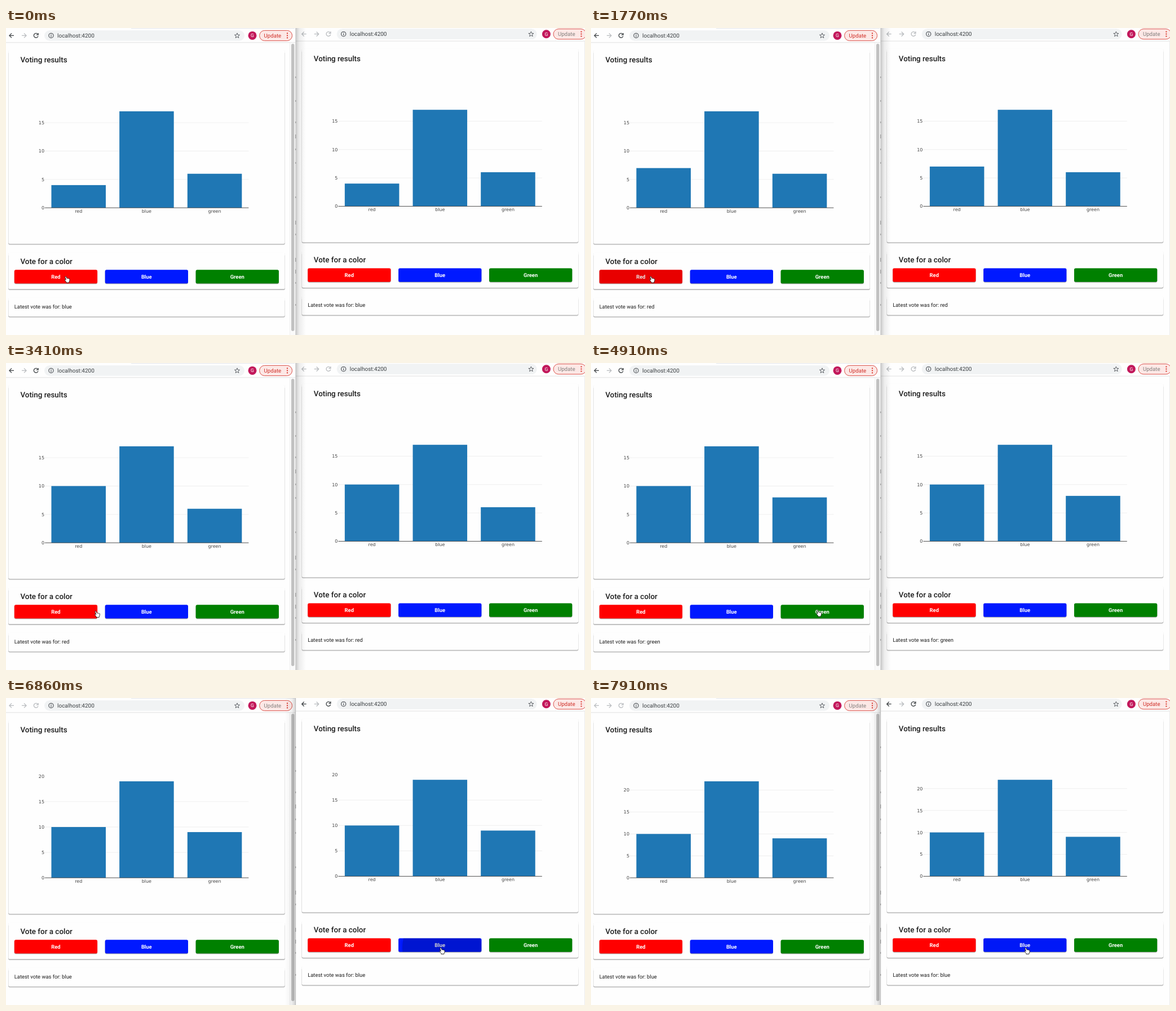
Recreate the animation shown at these times as an HTML page. Size 1027 by 545 pixels, loop 8000 ms.

```html
<!DOCTYPE html>
<html lang="en">
<head>
<meta charset="utf-8">
<title>Voting results</title>
<style>
html, body { margin: 0; width: 100%; height: 100%; overflow: hidden; background: #fefefe; }
svg { display: block; width: 1027px; height: 545px; }
text { font-family: Roboto, sans-serif; fill: #1c1c1c; white-space: pre; text-rendering: geometricPrecision; }
.title { font-size: 13.4px; font-weight: 500; }
.body { font-size: 9.4px; }
.label { font-size: 9.4px; font-weight: 700; fill: #fff; text-anchor: middle; }
.tick { font: 8px "DejaVu Sans", sans-serif; fill: #444; }
.btn { filter: drop-shadow(0 1px .6px rgba(0,0,0,.36)); }
.icon { fill: none; stroke-width: 1.3; }
</style>
</head>
<body>
<svg id="stage" viewBox="0 0 1027 545" xmlns="http://www.w3.org/2000/svg">
  <defs>
    <linearGradient id="fall"><stop offset="0" stop-opacity=".2"/><stop offset=".35" stop-opacity=".07"/><stop offset="1" stop-opacity="0"/></linearGradient>
    <linearGradient id="rise"><stop offset="0" stop-opacity="0"/><stop offset=".65" stop-opacity=".05"/><stop offset="1" stop-opacity=".17"/></linearGradient>
  </defs>
</svg>
<script>
const LOOP = 8000, CLICK = 90, ENTER = 225, EXIT = 150, FOCUS_AT = 6260;
const stage = document.getElementById('stage');

function add(parent, tag, attrs, text) {
  const node = document.createElementNS('http://www.w3.org/2000/svg', tag);
  set(node, attrs);
  if (text !== undefined) node.textContent = text;
  parent.appendChild(node);
  return node;
}
function set(node, attrs) {
  for (const key in attrs) node.setAttribute(key, attrs[key]);
}
const rect = (p, x, y, width, height, fill, more) =>
  add(p, 'rect', { x, y, width, height, fill, ...more });
const label = (p, x, y, cls, text, more) => add(p, 'text', { x, y, class: cls, ...more }, text);

const COLORS = [
  { name: 'red', title: 'Red', fill: '#ff0000', start: 4, tap: [107.5, 444, 97] },
  { name: 'blue', title: 'Blue', fill: '#0019ff', start: 17, tap: [252.7, 446, 81] },
  { name: 'green', title: 'Green', fill: '#008000', start: 6, tap: [403, 441, 86] }
];

// Button presses: time, window, color
const PRESSES = [
  [800, 0, 0], [1140, 0, 0], [1470, 0, 0], [1950, 0, 0], [2360, 0, 0], [2720, 0, 0],
  [4250, 0, 2], [4535, 0, 2], [4915, 0, 2],
  [6250, 1, 1], [6750, 1, 1], [7000, 1, 1], [7220, 1, 1], [7560, 1, 1]
];

// Pointer positions: time, x, y
const POINTER = [
  [0, 103.7, 440.5], [3410, 157, 440], [3560, 238, 441], [3710, 325, 440], [3860, 386, 439],
  [4010, 399.5, 438.5], [5210, 690, 430], [5360, 800, 448], [5510, 911, 456],
  [5660, 860, 452], [5810, 790, 445], [5960, 768.8, 443]
];

const ZERO = 319.2, TALL = 171.3, LEFT = 68.4, RIGHT = 430.4, SLOT = (RIGHT - LEFT) / 3;

function toolbar(win, x, endX, y) {
  const left = add(win, 'g', { transform: `translate(${x} ${y})` });
  const right = add(win, 'g', { transform: `translate(${endX} ${y})` });
  const arrow = (cx, dir, stroke) => add(left, 'path', {
    class: 'icon', stroke, d: `M${cx - 4 * dir} 13.4H${cx + 4 * dir}M${cx} 9.4L${cx + 4 * dir} 13.4L${cx} 17.4`
  });
  const back = arrow(10, -1);
  arrow(32, 1, '#b8bbbe');
  const reload = add(left, 'path', { class: 'icon', d: 'M56.3 10.8A3.9 3.9 0 1 0 57 14.4M57.2 8.9V12.2H53.8' });
  rect(left, 68, 4.2, 355, 18.6, '#f1f3f4', { rx: 9.3 });
  add(left, 'circle', { cx: 80, cy: 13.4, r: 4.1, class: 'icon', stroke: '#5f6368', 'stroke-width': 1 });
  add(left, 'path', { d: 'M80 12.8V15.8M80 10.9V11.9', class: 'icon', stroke: '#5f6368' });
  label(left, 91, 16.9, '', 'localhost:4200', { 'font-size': 10, style: 'fill:#3c4043' });

  let star = '';
  for (let i = 0; i < 10; i++) {
    const r = i % 2 ? 2 : 4.8, a = Math.PI * (i / 5 - .5);
    star += (i ? 'L' : 'M') + (410 + r * Math.cos(a)).toFixed(2) + ' ' + (13.7 + r * Math.sin(a)).toFixed(2);
  }
  add(right, 'path', { d: star + 'Z', fill: 'none', stroke: '#5f6368', 'stroke-width': 1 });
  add(right, 'circle', { cx: 437, cy: 13.4, r: 7.5, fill: '#c2185b' });
  label(right, 437, 16.4, '', 'G', { 'font-size': 8.5, 'text-anchor': 'middle', style: 'fill:#fff' });
  rect(right, 449.6, 4.4, 58, 18.2, '#fce8e6', { rx: 9.1, stroke: '#db5048', 'stroke-width': 1 });
  const update = label(right, 457.5, 16.9, '', 'Update', { 'font-size': 9.7 });
  for (const dy of [-4, 0, 4]) add(right, 'circle', { cx: 499, cy: 13.4 + dy, r: 1.1, fill: '#d93025' });

  return focused => {
    const ink = focused ? '#3c4043' : '#b8bbbe';
    set(back, { stroke: ink });
    set(reload, { stroke: ink });
    update.style.fill = focused ? '#d0312a' : '#85807f';
  };
}

function makeCard(page, top, bottom) {
  const side = { rx: 2.7 };
  rect(page, 4, top + .4, 491, bottom - top + 1.2, '#ebebeb', side);
  rect(page, 4.2, top + 4, 490.6, bottom - top - 3.1, '#b0b0b0', side);
  rect(page, 4.4, top, 490.2, bottom - top - .4, '#fefefe', side);
}

function makeChart(page) {
  const ticks = [0, 5, 10, 15, 20].map(value => ({
    value,
    line: add(page, 'path', { stroke: '#eee', 'stroke-width': .9 }),
    text: label(page, 68, 0, 'tick', value, { 'text-anchor': 'end' })
  }));
  const bars = COLORS.map((c, i) => {
    const mid = LEFT + SLOT * (i + .5);
    label(page, mid, 328, 'tick', c.name, { 'text-anchor': 'middle' });
    return rect(page, mid - SLOT * .4, 0, SLOT * .8, 0, '#1f77b4');
  });
  add(page, 'path', { d: `M${LEFT + .6} ${ZERO}H${RIGHT}`, stroke: '#444', 'stroke-width': .9 });

  return votes => {
    const max = Math.max(...votes), yOf = v => ZERO - v / max * TALL;
    bars.forEach((bar, i) => set(bar, { y: yOf(votes[i]), height: ZERO - yOf(votes[i]) }));
    for (const { value, line, text } of ticks) {
      const room = max / .95 - value, y = yOf(value);
      set(line, { d: `M${LEFT} ${y}H${RIGHT}`, visibility: room > .01 ? 'visible' : 'hidden' });
      set(text, { y: y + 2.9, visibility: room > -.01 ? 'visible' : 'hidden' });
    }
  };
}

function makeWindow(index, x, y, barX, barEnd) {
  const win = add(stage, 'g', {});
  const edge = index ? 514 : 0;
  rect(win, edge, 0, 514, 545, '#fefefe');
  rect(win, edge, 25.4 + y, 514, .9, '#dcdcdc');
  const paintBar = toolbar(win, barX, barEnd, y);

  const page = add(win, 'g', { transform: `translate(${x} ${y})` });
  makeCard(page, 39, 383.6);
  makeCard(page, 398.5, 464);
  makeCard(page, 478.5, 512.6);
  label(page, 25.4, 61.4, 'title', 'Voting results');
  label(page, 25.4, 419.2, 'title', 'Vote for a color');
  const paintChart = makeChart(page);

  const layers = COLORS.map((c, i) => {
    const left = 14.8 + 160.9 * i, id = `clip${index}${i}`;
    const box = [left, 429.3, 147.3, 24.2];
    rect(page, ...box, c.fill, { class: 'btn', rx: 2.7 });
    label(page, left + 73.6, 444.7, 'label', c.title);
    rect(add(page, 'clipPath', { id }), ...box, '#000', { rx: 2.7 });
    return add(page, 'g', { 'clip-path': `url(#${id})` });
  });
  const ripples = PRESSES.filter(p => p[1] === index).map(([at, , c]) => {
    const [cx, cy, reach] = COLORS[c].tap;
    return { at, reach, node: add(layers[c], 'circle', { cx, cy, r: 0 }) };
  });
  const latest = label(page, 14.8, 498.1, 'body', '');

  return (t, votes, last, focused) => {
    paintBar(focused);
    paintChart(votes);
    latest.textContent = 'Latest vote was for: ' + last;
    for (const { at, reach, node } of ripples) {
      const age = t - at, alive = age > 0 && age < ENTER + EXIT;
      const p = Math.min(1, Math.max(0, age / ENTER));
      const fade = 1 - Math.max(0, age - ENTER) / EXIT;
      set(node, { r: alive ? reach * (1 - (1 - p) ** 3) : 0, opacity: alive ? .18 * fade : 0 });
    }
  };
}

const windows = [makeWindow(0, 0, 0, 0, 0), makeWindow(1, 520.4, -2.7, 518.7, 521.4)];

// Scrollbar, tab edge and the sliver of whatever lies behind
rect(stage, 222, 0, 290, .8, '#dee1e6');
rect(stage, 503.5, 26.3, 9.7, 519, '#fafafa');
rect(stage, 503.3, 26.3, .6, 519, '#e8e8e8');
rect(stage, 506, 28, 5.4, 510, '#c1c1c1', { rx: 2.7 });
rect(stage, 513.2, 0, 1, 545, '#d2d2d2');
for (const y of [86, 128, 166, 189, 214, 238, 299, 342, 365, 408, 429, 451, 490])
  rect(stage, 513, y, 1.2, y % 3 ? 3 : 7, '#999');
rect(stage, 1026, 24, 1, 521, '#ececec');
const shadeRight = rect(stage, 514, 0, 18, 545, 'url(#fall)');
const shadeLeft = rect(stage, 494, 0, 19.8, 545, 'url(#rise)');

const pointer = add(stage, 'g', { stroke: '#111', 'stroke-width': .85, fill: '#fff', 'stroke-linejoin': 'round' });
const hand = add(pointer, 'path', {
  d: 'M2.2 .5C1.1 .5 1 1.5 1.3 2.5L2.7 6.5C1.7 5.6 .4 5.5 .3 6.4C1 7.2 1.9 9 3.1 10.3V11.6H8.1L8.3 10C9.4 8.6 9.5 6.5 9.1 5C8.5 4.2 7.7 4.3 7.3 4.6C6.9 3.9 5.9 3.8 5.5 4.2C5.1 3.7 4.4 3.6 4.1 3.8L3.3 1.3C3 .6 2.6 .5 2.2 .5Z'
});
const arrow = add(pointer, 'path', {
  d: 'M1 0V11.5L3.6 9.1L5.3 13L7.1 12.2L5.4 8.4H9Z', fill: '#111', stroke: '#fff'
});

// The screen refreshes in coarse steps
function snap(t) {
  if (t < 890) return 0;
  if (t < 1910) return 890 + Math.floor((t - 890) / 146.6) * 146.6;
  return 1910 + Math.floor((t - 1910) / 150) * 150;
}

let shown = -1;
function paint() {
  const t = snap(performance.now() % LOOP);
  if (t !== shown) {
    shown = t;
    const votes = COLORS.map(c => c.start);
    let last = 'blue';
    for (const [at, , c] of PRESSES) {
      if (at + CLICK > t) break;
      votes[c]++;
      last = COLORS[c].name;
    }
    const active = t >= FOCUS_AT ? 1 : 0;
    windows.forEach((draw, i) => draw(t, votes, last, i === active));
    set(shadeRight, { visibility: active ? 'hidden' : 'visible' });
    set(shadeLeft, { visibility: active ? 'visible' : 'hidden' });

    const [, x, y] = POINTER.filter(p => p[0] <= t).pop();
    const idle = !active && x > 514;
    set(pointer, { transform: `translate(${x} ${y})` });
    set(hand, { visibility: idle ? 'hidden' : 'visible' });
    set(arrow, { visibility: idle ? 'visible' : 'hidden' });
  }
  requestAnimationFrame(paint);
}
paint();
</script>
</body>
</html>
```
